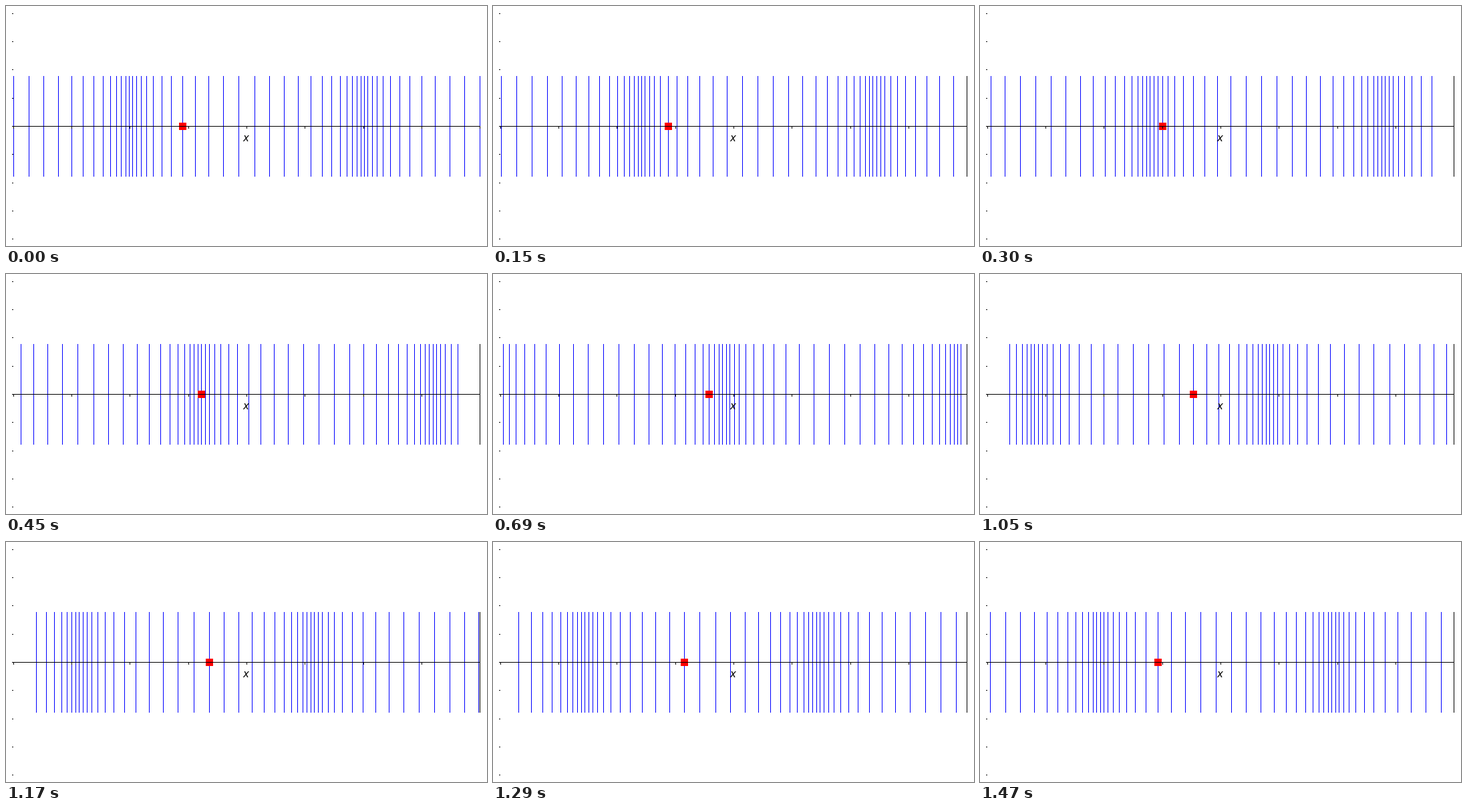
Write an HTML page with a canvas that moves like this. It is 720 by 360 pixels and loops after 1500 ms.

```html
<!DOCTYPE html>
<html lang="en">
<head>
<meta charset="utf-8">
<title>Longitudinal wave</title>
<style>
html, body { margin: 0; width: 720px; height: 360px; overflow: hidden; background: #fff; }
canvas { display: block; }
</style>
</head>
<body>
<canvas id="stage" width="720" height="360"></canvas>
<script>
const ctx = document.getElementById('stage').getContext('2d');

const LOOP = 1500, STEP = 30;
const LEFT = 11.25, WIDTH = 698.4;
const TOP = 11.25, HEIGHT = 338.4;
const DIVISIONS = 8;
const LINES = 50, TRACKED = 20;
const AMPLITUDE = WIDTH / 20, WAVES = 2;
const AXIS_Y = 180, BAR_TOP = 105, BAR_HEIGHT = 151;

function rect(color, x, y, w, h) {
  ctx.fillStyle = color;
  ctx.fillRect(x, y, w, h);
}

function bar(color, x) {
  rect(color, x, BAR_TOP, 1, BAR_HEIGHT);
}

// Pixel column of a line: rest position plus a wave travelling right.
function column(i, turn) {
  const rest = i / (LINES - 1);
  const shift = AMPLITUDE * Math.sin(2 * Math.PI * (WAVES * rest - turn));
  return Math.floor(LEFT + WIDTH * rest + shift);
}

function drawAxes() {
  const right = Math.floor(LEFT + WIDTH);
  rect('#000', 11, AXIS_Y, right - 10, 1);
  for (let n = 0; n <= DIVISIONS; n++) {
    rect('#000', Math.floor(LEFT + WIDTH * n / DIVISIONS), AXIS_Y, 1, 4);
    rect('#000', 9, Math.floor(TOP + HEIGHT * n / DIVISIONS), 2, 1);
  }
  ctx.fillStyle = '#000';
  ctx.font = 'italic 15px "DejaVu Sans", sans-serif';
  ctx.textAlign = 'center';
  ctx.fillText('x', 359.5, 203);
}

function draw(turn) {
  rect('#fff', 0, 0, 720, 360);
  const right = Math.floor(LEFT + WIDTH);
  bar('#000', right);
  for (let i = 0; i < LINES; i++) {
    const x = column(i, turn);
    if (x >= 11 && x <= right) bar('#00f', x);
  }
  rect('#f00', column(TRACKED, turn) - 5, AXIS_Y - 5, 11, 11);
  drawAxes();
}

const start = performance.now();
function tick() {
  const time = (performance.now() - start) % LOOP;
  draw(Math.floor(time / STEP) * STEP / LOOP);
  requestAnimationFrame(tick);
}
tick();
</script>
</body>
</html>
```
